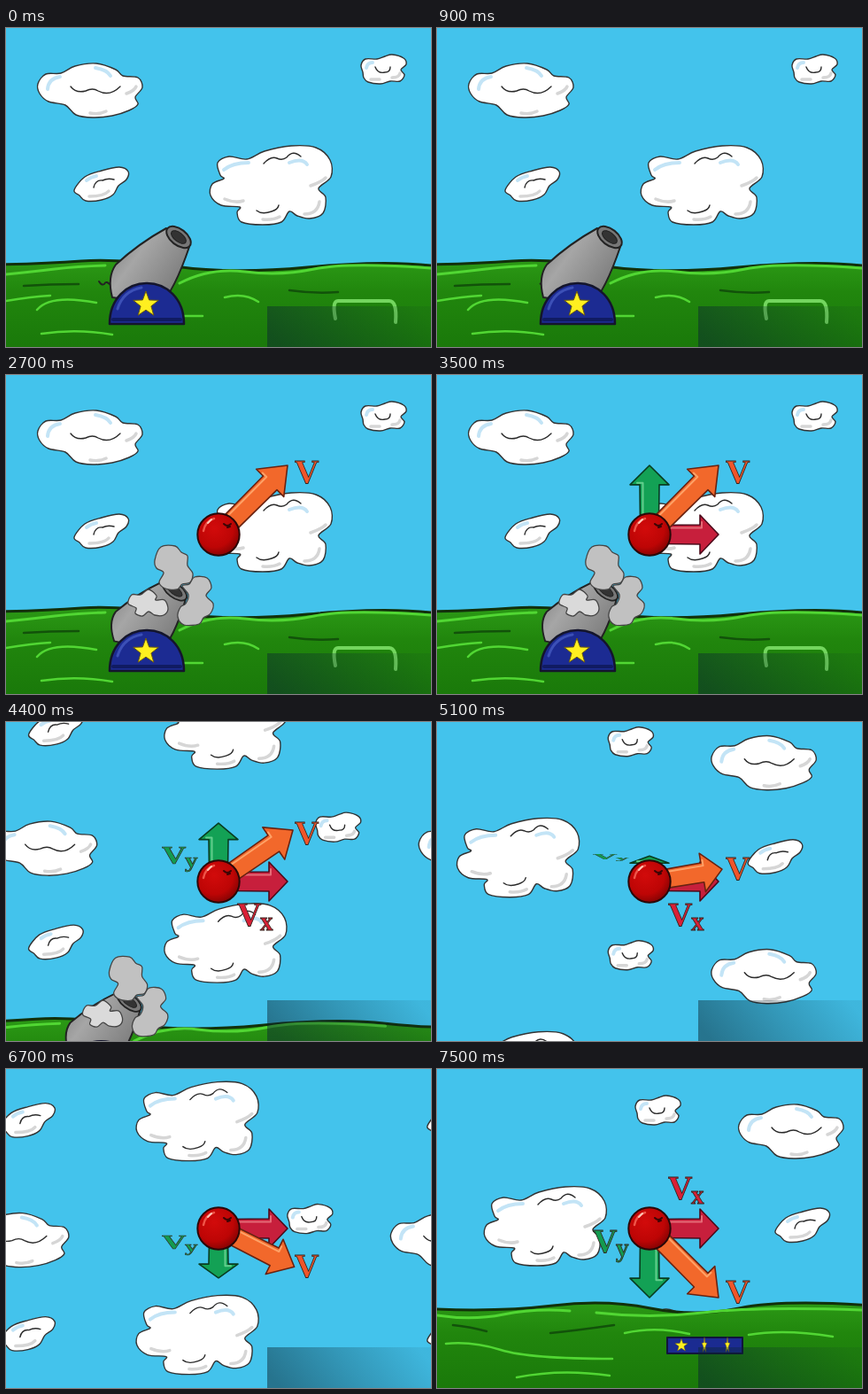
Write an HTML page that moves like this. It is 480 by 360 pixels and loops after 7600 ms.

```html
<!DOCTYPE html>
<html lang="en">
<head>
<meta charset="utf-8">
<title>Cannonball velocity</title>
<style>
html, body { margin: 0; width: 100%; height: 100%; overflow: hidden; background: #43c3ec; }
svg { display: block; width: 100vw; height: 100vh; }
text { font: bold 38px "Liberation Serif", "Noto Serif", serif; stroke: #33251f; stroke-width: .8; }
.sub { font-size: 29px; }
.line { fill: none; stroke-linecap: round; stroke-linejoin: round; }
</style>
</head>
<body>
<svg id="stage" viewBox="0 0 480 360"></svg>
<script>
const LOOP = 7600, STEP = 100;
const FIRE = 1400, LAUNCH = 4170, LAND = 7120;
const FLIGHT = LAND - LAUNCH, RANGE = 659, PEAK = 251;
const TILE = { w: 482, h: 241 };
const BALL = { x: 240, y: 180 }, REACH = 78;

const clamp = v => Math.max(0, Math.min(1, v));
const ramp = (t, a, b) => clamp((t - a) / (b - a));
const ease = v => v * v * (3 - 2 * v);
const el = id => document.getElementById(id);

// Smooth closed outline through a few points, as x y pairs.
function blob(coords) {
  const n = coords.length / 2;
  const at = i => { const k = (i + n) % n; return [coords[2 * k], coords[2 * k + 1]]; };
  let d = `M${at(0)}`;
  for (let i = 0; i < n; i++) {
    const [p, a, b, q] = [at(i - 1), at(i), at(i + 1), at(i + 2)];
    const c1 = a.map((v, k) => v + (b[k] - p[k]) / 6);
    const c2 = b.map((v, k) => v - (q[k] - a[k]) / 6);
    d += `C${c1} ${c2} ${b}`;
  }
  return d + 'Z';
}
const line = (d, color, width) =>
  `<path class="line" d="${d}" stroke="${color}" stroke-width="${width}"/>`;
const shape = (d, fill, stroke = '#222', width = 1.5) =>
  `<path d="${d}" fill="${fill}" stroke="${stroke}" stroke-width="${width}" stroke-linejoin="round"/>`;

function cloud(outline, creases, blue, grey) {
  return shape(blob(outline), '#fff', '#333', 1.4) + line(blue, '#c3e4f6', 4) +
    line(grey, '#d6d6d6', 3.5) + line(creases, '#2b2b2b', 1.4);
}
const clouds =
  cloud([36,63, 45,52, 62,51, 78,43, 102,40, 124,47, 132,54, 149,56, 154,67, 146,78, 149,86,
         139,93, 120,99, 98,101, 79,98, 67,87, 48,83, 38,74],
    'M73 66q6 8 17 5 8-4 14 0 13 7 25-5', 'M47 69q1-12 14-14M101 45q13 2 17 9', 'M95 96q10 2 18-2M136 74q9-3 11-8') +
  cloud([242,166, 239,152, 252,145, 272,148, 292,139, 322,133, 350,135, 366,149, 367,168, 353,181,
         361,191, 358,209, 343,215, 329,212, 320,207, 311,219, 290,222, 266,219, 261,208, 264,202,
         243,200, 231,189, 233,176, 246,170],
    'M291 153q8-9 15-6 6 3 11-1 7-9 16-1M283 206q6 5 17 1 7-2 8-7', 'M246 160q10-8 28-8M320 152q15-6 20 2',
    'M247 193q12 5 21 2M290 216q12 1 19-3M337 210q15 0 17-14M344 178q12-4 17-9') +
  cloud([77,183, 89,168, 108,161, 128,157, 138,162, 136,171, 127,178, 121,188, 108,194, 90,195, 83,189],
    'M99 180q2-9 10-8 6-3 13-1', 'M91 172q5-4 11-5', 'M94 190q17 0 22-6') +
  cloud([403,50, 401,42, 406,35, 419,35, 428,32, 436,30, 449,34, 452,41, 446,47, 450,53, 445,60,
         434,60, 423,63, 409,61, 404,56],
    'M417 44q3 8 11 6 6 0 6-6', 'M407 45q1-6 7-6', 'M412 58h10M436 56q8 0 9-5');

function sky() {
  let tiles = '';
  for (let i = 0; i < 3; i++) for (let j = -1; j < 3; j++)
    tiles += `<use href="#clouds" x="${i * TILE.w}" y="${j * TILE.h}"/>`;
  return tiles;
}

const hills = 'M-10 267Q45 266 85 263T190 269T340 270T480 268T560 271' +
  'T658 271T790 267T900 270T1000 270T1150 267';
const light = '#51d733', dark = '#12520a';
const ground = shape(hills + 'V800H-10Z', 'url(#grass)', '#12300b', 3) +
  line('M0 278Q30 275 55 272T112 268M196 288Q230 270 270 275T348 272T480 271', light, 3) +
  line('M35 318Q50 300 102 310M0 308q30-5 50-6M247 304q22-6 38 5M185 325h37M40 345q40-6 80 1', light, 2.5) +
  line('M20 291q30-2 62-2M320 296q28 4 55 2', dark, 2.5) +
  line('M372 328Q368 308 375 308H432Q442 307 440 332', '#73d65e', 4) +
  `<g transform="translate(${RANGE})">` +
  line('M0 278Q40 284 75 277T150 273M180 275Q240 282 300 275T480 272', light, 3) +
  line('M10 310Q40 307 72 317T198 327M212 298q35-8 73 1M352 300q40-7 95 2M90 348q50-10 105-2', light, 2.5) +
  line('M18 289q20 2 38 7M128 298q30-3 72-9', dark, 2.5) +
  shape('M260 303H345V321H260Z', '#1b2b91', '#11153b', 2) +
  `<g transform="translate(276 312) scale(.5)">${star()}</g>` +
  [302, 328].map(x => `<g transform="translate(${x} 312) scale(.2 .62)">${star()}</g>`).join('') + '</g>';

function star() {
  let points = '';
  for (let i = 0; i < 10; i++) {
    const r = i % 2 ? 6.2 : 15, a = (i / 5 - .5) * Math.PI;
    points += `${r * Math.cos(a)},${r * Math.sin(a)} `;
  }
  return `<polygon points="${points}" fill="#ffef20" stroke="#6b5b10" stroke-width="1"/>`;
}

const cannon = `<path id="fuse" class="line" d="M119 291q-6-7-8-2-3 2-6-3" stroke="#222" stroke-width="2" pathLength="1"/>
  <g id="barrel">${shape('M181 226Q150 243 124 267Q114 281 120 304L174 312Q190 297 207 247Z', 'url(#steel)', '#222', 2)}
  <g transform="rotate(38 195 236)"><ellipse cx="195" cy="236" rx="16" ry="9" fill="#777" stroke="#222" stroke-width="2"/>
  <ellipse cx="195" cy="236" rx="10" ry="5" fill="#333" stroke="#222"/></g></g>
  ${shape('M117 334C117 305 137 288 159 288S201 305 201 334Z', '#1c2b92', '#14152c', 2.5)}
  ${line('M126 317Q132 297 153 293', '#3c50b7', 3)}${line('M121 329H197', '#101b62', 4)}
  <g transform="translate(158 312)">${star()}</g>`;

const puffs = [
  [188, 217, '#c1c1c1', [-20,-8, -13,-23, 3,-24, 10,-17, 17,-13, 17,-2, 23,7, 20,17, 11,19, 5,25, -8,24, -15,17, -10,6, -18,1]],
  [214, 256, '#c1c1c1', [-15,-18, -7,-20, -1,-28, 13,-27, 18,-16, 12,-7, 20,2, 17,13, 9,18, 4,25, -13,26, -20,17, -17,6, -11,2, -8,-8]],
  [160, 258, '#dadada', [-22,0, -18,-10, -8,-10, 1,-16, 10,-9, 9,-4, 19,-4, 23,6, 18,13, 8,13, 1,9, -6,14, -14,11, -13,5]]
];
const smoke = puffs.map(([x, y, fill, pts], i) =>
  `<g class="puff" data-x="${x}" data-y="${y}">${shape(blob(pts), fill, '#444', 1.3)}</g>`).join('');

const ball = `<circle r="23.7" fill="url(#shine)" stroke="#2a0808" stroke-width="2"/>
  ${line('M-17 -4Q-15 -15 -5 -18', '#ee5549', 2.5)}${line('M-12 -13l4-4', '#ffc9b9', 2)}
  ${line('M6 -12q4 4 8 0M10 -8l3-1', '#3b0505', 2)}`;

const arrow = (id, fill, edge, gleam) =>
  `<g id="${id}"><path class="body" fill="${fill}" stroke="${edge}" stroke-width="1.6" stroke-linejoin="round"/>
  <path class="gleam line" stroke="${gleam}" stroke-width="2"/></g>`;
const label = (id, fill, sub = '') =>
  `<g id="${id}" fill="${fill}"><text>V</text><text class="sub" x="26" y="5">${sub}</text></g>`;

el('stage').innerHTML = `<defs>
  <linearGradient id="grass" gradientUnits="userSpaceOnUse" x1="0" y1="265" x2="0" y2="360">
    <stop stop-color="#2b9815"/><stop offset=".35" stop-color="#21860d"/><stop offset="1" stop-color="#1a790a"/></linearGradient>
  <linearGradient id="steel" x1="0" y1="0" x2="1" y2=".7">
    <stop stop-color="#777"/><stop offset=".4" stop-color="#a6a6a6"/><stop offset="1" stop-color="#777"/></linearGradient>
  <radialGradient id="shine" cx=".4" cy=".35" r=".7">
    <stop stop-color="#d20b0b"/><stop offset=".65" stop-color="#bd0505"/><stop offset="1" stop-color="#7e0303"/></radialGradient>
  <linearGradient id="shade" x1="0" y1=".6" x2="1" y2=".4">
    <stop stop-color="#0a2530" stop-opacity=".5"/><stop offset=".5" stop-color="#0a2530" stop-opacity=".28"/>
    <stop offset="1" stop-color="#0a2530" stop-opacity=".08"/></linearGradient>
  <g id="clouds">${clouds}</g></defs>
  <rect width="480" height="360" fill="#43c3ec"/>
  <g id="sky">${sky()}</g>
  <g id="land">${ground}</g>
  <g id="gun"></g>
  <rect x="295" y="314" width="185" height="46" fill="url(#shade)"/>
  ${arrow('vxArrow', '#c71f3c', '#4c0a1a', '#e56b76')}
  ${arrow('vyArrow', '#13a155', '#083d20', '#62cf8d')}
  ${arrow('vArrow', '#f2682b', '#692210', '#ffa267')}
  <g id="ball">${ball}</g>
  <g id="smoke">${smoke}</g>
  ${label('vText', '#f0552a')}${label('vxText', '#d92036', 'x')}${label('vyText', '#139b50', 'y')}`;
el('gun').innerHTML = cannon;

function setArrow(id, length, angle, headLength, shown) {
  const node = el(id), neck = length - headLength;
  node.style.display = shown > 0 && length > 1 ? '' : 'none';
  node.setAttribute('transform', `translate(${BALL.x} ${BALL.y}) rotate(${angle})`);
  const start = Math.min(12, neck);
  node.querySelector('.body').setAttribute('d',
    `M${start} -10.5L${neck} -11V-22L${length} 0L${neck} 22V11L${start} 10.5Z`);
  node.querySelector('.gleam').setAttribute('d', `M${start} -7.5H${neck + 2}V-14`);
}
function setLabel(id, x, y, opacity, squash = 1) {
  el(id).setAttribute('transform', `translate(${x} ${y}) scale(1 ${squash})`);
  el(id).setAttribute('opacity', opacity);
}

function render(t) {
  const p = ramp(t, LAUNCH, LAND);
  const dx = -RANGE * p, dy = 4 * PEAK * p * (1 - p);
  const move = (id, x, y) => el(id).setAttribute('transform', `translate(${x} ${y})`);
  move('sky', dx % TILE.w, dy % TILE.h);
  move('land', dx, dy);
  move('gun', dx, dy);
  move('smoke', dx, dy);

  const squeeze = ease(ramp(t, 1000, FIRE));
  el('barrel').setAttribute('transform',
    `translate(150 285) rotate(32) scale(1 ${1 - .13 * squeeze}) rotate(-32) translate(-150 -285)`);
  el('fuse').setAttribute('stroke-dasharray', `${1 - ramp(t, 0, 1100)} 2`);
  el('fuse').style.display = t < 1100 ? '' : 'none';

  const shot = ramp(t, FIRE, FIRE + 250);
  el('ball').style.display = t >= FIRE ? '' : 'none';
  move('ball', 194 + 46 * shot, 238 - 58 * shot);

  const puff = ease(ramp(t, FIRE - 50, FIRE + 250));
  el('smoke').style.display = puff > 0 ? '' : 'none';
  for (const g of document.querySelectorAll('.puff')) {
    const { x, y } = g.dataset;
    g.setAttribute('transform', `translate(${x} ${y}) scale(${puff})`);
  }

  // Positive fall means the ball is descending; bend eases the tilt through the apex.
  const fall = 2 * p - 1;
  const bend = Math.sign(fall) * Math.abs(fall) ** 1.55;
  const vGrow = ease(ramp(t, 2000, 2400)), partGrow = ease(ramp(t, 2700, 3200));
  setArrow('vArrow', Math.hypot(REACH, REACH * fall) * vGrow, 45 * bend, 21 + 7 * Math.abs(bend), vGrow);
  setArrow('vxArrow', REACH * partGrow, 0, 21, partGrow);
  const vy = REACH * Math.abs(fall) * partGrow;
  setArrow('vyArrow', vy, fall < 0 ? -90 : 90, .28 * vy, partGrow);

  const named = ramp(t, 3600, 3900);
  setLabel('vText', 326, 193 + 71 * bend, ramp(t, 2200, 2500));
  const rising = t < 6300;
  setLabel('vxText', 261, rising ? 230 : 147,
    rising ? named * (1 - ramp(t, 5650, 6000)) : ramp(t, 7100, 7400));
  const size = Math.abs(bend);
  setLabel('vyText', 176, (fall < 0 ? 153 : 198) + 9 * size, named, size);
}

const began = performance.now();
function frame() {
  const t = (performance.now() - began) % LOOP;
  render(Math.floor(t / STEP) * STEP);
  requestAnimationFrame(frame);
}
frame();
</script>
</body>
</html>
```
